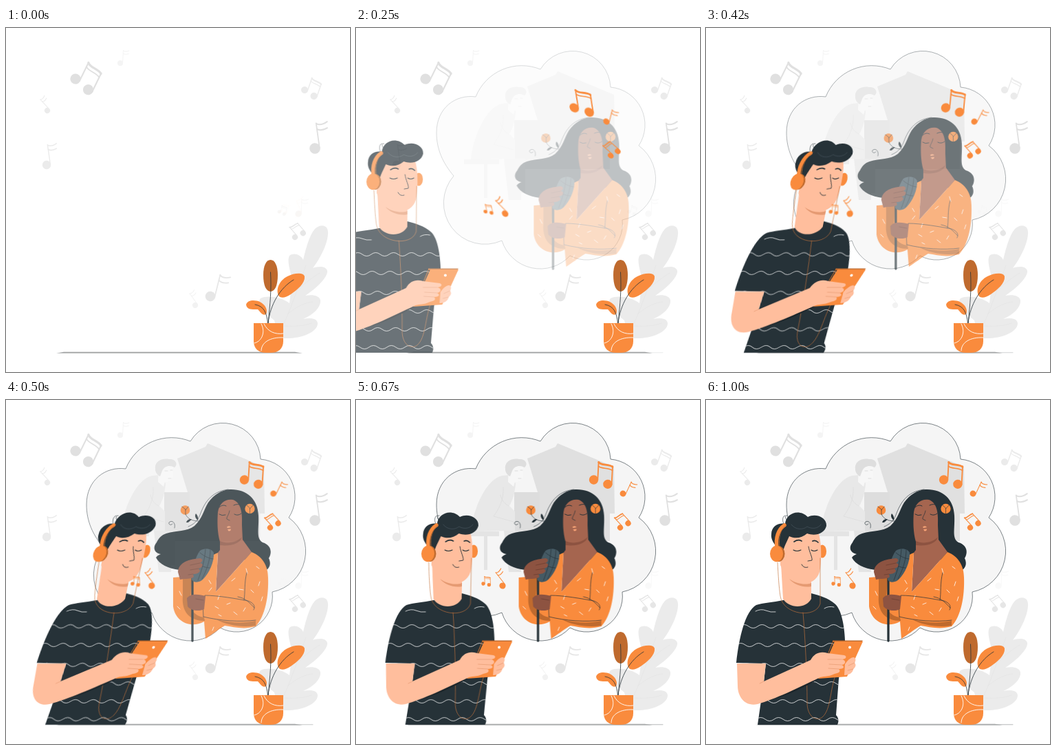
Animation of 500x500 px, one loop 1040 ms. Source, as an HTML page:

```html
<!DOCTYPE html>
<html lang="en">
<head>
<meta charset="utf-8">
<title>Listening to music</title>
<style>
  :root { --t: 0s; --ease: cubic-bezier(.36, -.01, .5, 1.38); }
  html, body { margin: 0; width: 100%; height: 100%; overflow: hidden; background: #fff; }
  svg { display: block; width: 100vw; height: 100vh; }
  .cloud, .singer, .man, .tunes { animation: fade 1s var(--ease) var(--t) both paused; }
  .singer { animation-name: slide; }
  .man { animation-name: enterLeft; transform-origin: 0 315px; }
  .tunes { animation-name: enterRight; animation-duration: .6s; transform-origin: 0 181px; }
  @keyframes fade { from { opacity: 0; } to { opacity: 1; } }
  @keyframes slide {
    from { opacity: 0; transform: translateX(30px); }
    to { opacity: 1; transform: translateX(0); }
  }
  @keyframes enterLeft {
    from { opacity: 0; transform: translateX(-250px) skewX(20deg); }
    60% { opacity: 1; transform: translateX(0) skewX(-10deg); }
    80% { opacity: 1; transform: translateX(0) skewX(2deg); }
    to { opacity: 1; transform: translateX(0) skewX(0deg); }
  }
  @keyframes enterRight {
    from { opacity: 0; transform: translateX(250px) skewX(-20deg); }
    60% { opacity: 1; transform: translateX(0) skewX(10deg); }
    80% { opacity: 1; transform: translateX(0) skewX(-2deg); }
    to { opacity: 1; transform: translateX(0) skewX(0deg); }
  }
  .line { fill: none; stroke-linecap: round; stroke-linejoin: round; }
  .ink { fill: #263238; }
  .orange { fill: #f98b3d; }
  .rust { fill: #bf6a2e; }
  .skin { fill: #ffbe9d; }
  .brown { fill: #a5654f; }
  .dusk { fill: #8d5341; }
  .inkline { stroke: #263238; }
  .white { stroke: #fff; }
</style>
</head>
<body>
<svg viewBox="0 0 500 500">
  <defs>
    <g id="pair" fill="currentColor" stroke="none">
      <circle r="7.6"/>
      <circle cx="23.5" cy="6" r="7.6"/>
      <g class="line" stroke="currentColor">
        <path stroke-width="2.1" d="M6.6 0V-30M30 6V-24"/>
        <path stroke-width="3.2" d="M6.6 -29.5C11 -23.500 23 -28 30 -23"/>
        <path stroke-width="1.8" d="M6.6 -23C11 -18 23 -22 30 -17"/>
      </g>
    </g>
    <g id="solo" fill="currentColor" stroke="none">
      <circle r="7.8"/>
      <g class="line" stroke="currentColor">
        <path stroke-width="1.8" d="M6.8 0V-36"/>
        <path stroke-width="2" d="M6.8 -35.5C11 -32 17 -33 23 -36M6.8 -27.5C11 -24 17 -25 22 -27"/>
      </g>
    </g>
    <path id="shirt" d="M112 291C98 294 82 295 73 298C57 307 48 345 44 382L87 383L84 410L75 472H191C194 466 192 461 189 458L193 405L202 350C201 325 196 303 187 296C178 288 165 284 153 281Z"/>
    <path id="wave" d="M36 0q6.5 6 13 1t13 0t13 0t13 0t13 0t13 0t13 0t13 0t13 0t13 0t13 0t13 0t13 0"/>
    <clipPath id="inShirt"><use href="#shirt"/></clipPath>
  </defs>

  <!-- grey notes -->
  <g color="#ebebeb">
    <use href="#pair" transform="translate(101 74) rotate(26)" color="#e0e0e0"/>
    <use href="#solo" transform="translate(449 175) rotate(-8)" color="#e0e0e0"/>
    <use href="#pair" transform="translate(434 90) rotate(19) scale(.67)"/>
    <use href="#pair" transform="translate(420 304) rotate(-41) scale(.54)" color="#e6e6e6"/>
    <use href="#pair" transform="translate(397 267) rotate(12) scale(.33)" color="#f8f8f8"/>
    <use href="#solo" transform="translate(59 199) rotate(-8) scale(.8)"/>
    <use href="#solo" transform="translate(297 390) rotate(14) scale(.94)" color="#e6e6e6"/>
    <use href="#solo" transform="translate(166 51) rotate(3) scale(.52)" color="#f4f4f4"/>
    <use href="#solo" transform="translate(60 120) rotate(-43) scale(.52)"/>
    <use href="#solo" transform="translate(275 403) rotate(-36) scale(.52)" color="#f2f2f2"/>
    <use href="#solo" transform="translate(425 270) rotate(2) scale(.6)" color="#f9f9f9"/>
  </g>

  <!-- ground -->
  <path fill="#a6a8a9" d="M73 472.7L84 470.8H420L431 472.7Z"/>

  <!-- thought bubble, piano and pianist -->
  <g class="cloud">
    <path class="line" stroke="#b5b7b8" stroke-width="1" d="M76 471.8H446"/>
    <path fill="#f5f5f5" stroke="#263238" stroke-width=".6" d="M174 100A72 72 0 0 1 268 60A55 55 0 0 1 370 86A55 55 0 0 1 411 171A60.500 60.500 0 0 1 387 279A52 52 0 0 1 311 331A58.500 58.500 0 0 1 212 309A60 60 0 0 1 142 215C126 196 117 176 117 152C117 116 145 96 174 100Z"/>
    <path fill="#e0e0e0" d="M293 63L375 97L376 165H369V205H240V190H232V134H264L249 85L290 68Z"/>
    <path fill="#dddddd" d="M230 134H267V190H230Z"/>
    <g fill="#e4e4e4">
      <path d="M157 191H208V198H157ZM186 198H191V247H186Z"/>
      <path d="M215 190H246V240H240V250H222Z"/>
      <path fill="#e8e8e8" d="M167 191C170 160 188 116 212 110L224 109L232 121C231 135 228 145 223 154L231 162V190Z"/>
    </g>
    <path class="line" stroke="#d8d8d8" stroke-width=".6" d="M214 127C215 145 208 158 200 169L229 177M222 154C216 151 211 145 210 138"/>
    <path fill="#f7f7f7" d="M222 97C230 92 241 93 243 98L243 110C241 117 236 120 231 119L229 126L221 119Z"/>
    <path fill="#dedede" d="M217 101C215 90 226 84 237 86C246 85 251 93 245 98C238 94 230 96 227 103L224 111C220 109 217 105 217 101Z"/>
    <path class="line" stroke="#cfcfcf" stroke-width=".7" d="M231 103h4M239 102h3M236 114h4"/>
  </g>

  <!-- singer -->
  <g class="singer">
    <path class="ink" d="M319 130C343 129 360 143 361 168C362 188 357 201 367 207C380 211 381 222 376 230C380 238 377 246 370 248C358 248 340 235 335 225L302 222C298 240 268 250 246 247C230 245 217 239 212 229C214 226 217 225 219 224C209 222 207 214 213 207C216 201 220 196 227 194C242 189 257 192 268 183C280 172 281 160 288 149C297 137 307 131 319 130Z"/>
    <path class="line inkline" stroke-width=".6" d="M317 130C291 133 282 151 276 167C272 177 266 181 259 184"/>
    <path class="brown" d="M302 163C304 150 313 143 324 145C335 149 338 162 337 182L338 203L351 221C336 238 318 258 299 279L302 222L305 218V206C301 192 301 176 302 163Z"/>
    <path class="dusk" d="M305 205C315 210 330 207 337 199C335 209 320 213 305 211Z"/>
    <g class="line inkline" stroke-width="1">
      <path d="M304 156Q309 151 314 154M325 153Q331 150 336 153"/>
      <path d="M304 166Q308 169 313 167M326 166Q331 169 336 165"/>
      <path stroke-width=".7" d="M319 161C318 167 314 171 315 173L319 175"/>
    </g>
    <path fill="#f6a276" d="M315 184.500Q319 182 321 185L316 186ZM316 188L321 187.500Q321 191 317.500 190.500Z"/>
    <path class="orange" d="M302 222L299 279C318 258 336 238 351 221C366 227 375 240 375 258C376 285 371 314 357 329C340 334 325 330 312 328C302 334 292 342 284 347L282 322C262 333 240 322 237 300V258L263 256L281 242C286 231 294 225 302 222Z"/>
    <g class="rust">
      <path d="M251 258H264L262 288C259 300 266 314 282 316L283 321C261 321 249 308 251 285Z"/>
      <path d="M300 319C320 324 340 325 357 321L357 328C336 331 314 327 300 319Z"/>
    </g>
    <path class="line white" stroke-width=".8" d="M246 278l3 6M243 300l4 4M290 240l3 -6M289 262l3 5M293 273l-4 5M304 284l-2 6M322 263l5 -4M333 275l6 1M345 252l-2 -7M358 242l4 3M363 264l-2 6M350 276l4 4M367 286l-2 6M298 300l5 3M315 297l5 -2M325 308l5 4M342 302l-3 5M296 330l-2 5M307 314l-4 -2"/>
    <path class="line inkline" stroke-width=".7" d="M281 315C280 304 281 294 283 284C302 284 330 289 346 292C354 295 357 300 354 305M281 315C305 321 335 323 357 320M344 251C340 266 342 280 340 291M331 286C343 288 349 296 355 302"/>
    <path class="line inkline" stroke-width="3.300" stroke-linecap="butt" d="M265 255V350"/>
    <path fill="#455a64" d="M276 219C283 214 294 216 296 222C297 235 289 252 281 260C276 266 266 266 264 261C264 247 269 228 276 219Z"/>
    <path class="line inkline" stroke-width=".7" d="M276 222C282 227 288 230 295 231M271 236C277 241 284 244 290 244M284 217C283 231 279 247 273 262M291 218C291 232 286 247 279 260"/>
    <path class="dusk" d="M244 250C245 238 255 232 276 230C281 231 280 235 276 237L279 238C281 242 277 244 274 245L276 248C275 252 270 253 266 253L267 257C263 261 255 259 247 261Z"/>
    <path class="dusk" d="M257 288C263 280 277 283 284 285L282 304C275 308 262 306 258 300Z"/>
    <path class="line" stroke="#62382d" stroke-width=".6" d="M276 237L262 240M274 245L262 247M266 253L259 254M281 291L270 289"/>
    <circle class="orange" cx="348.500" cy="158" r="7.200"/>
    <circle class="orange" cx="254.500" cy="160" r="6.800"/>
    <path class="line inkline" stroke-width=".65" d="M348.500 165V157L344 153M348.500 158L353 153M255 166V159L250 155M255 160L259 155M255 166C258 173 265 176 274 176M239 186C241 178 235 174 231 178C230 181 234 183 236 180"/>
    <path class="ink" d="M264 173C259 179 258 178 256 178C258 173 261 173 264 173ZM270 165C273 168 274 173 273 175C269 172 268 168 270 165Z"/>
  </g>

  <!-- listener -->
  <g class="man">
    <ellipse class="orange" cx="169" cy="220" rx="6" ry="9.500"/>
    <use href="#shirt" class="ink"/>
    <path class="skin" d="M108 222L112 289C120 303 145 304 153 289V258Z"/>
    <path fill="#e59a72" d="M121 260C132 268 146 269 153 266V271C141 273 129 269 121 260Z"/>
    <path class="skin" d="M108 205C114 188 142 186 163 192C168 205 168 228 166 245C164 260 154 267 140 266C124 264 114 254 108 240Z"/>
    <path class="ink" d="M95 195C95 184 105 178 115 180C116 165 135 157 148 170C160 164 176 171 175 183C172 195 158 198 147 194C139 201 129 202 121 198C117 207 113 214 112 221L104 215C98 208 94 202 95 195Z"/>
    <path class="line inkline" stroke-width=".6" d="M113 180C110 174 112 168 115 168M117 174C114 171 115 167 118 168"/>
    <path class="line" stroke="#52616a" stroke-width=".5" d="M124 181C130 189 141 189 147 184C154 188 163 187 167 181"/>
    <g class="line inkline" stroke-width="1.100">
      <path stroke-width="1.700" d="M128 206Q134 202 139 205M155 205Q159 203 163 207"/>
      <path d="M127 218Q132 221 138 218M153 218Q157 221 162 218"/>
      <path stroke-width=".9" d="M149 213C150 221 155 229 154 233L148 234M139 239Q142 245 148 243"/>
    </g>
    <path class="line" stroke="#f98b3d" stroke-width="5.500" d="M114 182C105 188 101 200 103 214"/>
    <path class="line" stroke="#bf6a2e" stroke-width=".8" d="M117 181C108 188 105 200 107 213"/>
    <ellipse class="rust" cx="105" cy="223.500" rx="9.500" ry="11.500"/>
    <ellipse class="orange" cx="102.500" cy="223.500" rx="9.500" ry="11.700"/>
    <g clip-path="url(#inShirt)" class="line white" stroke-width=".75">
      <use href="#wave" y="328"/>
      <use href="#wave" x="-5" y="355"/>
      <use href="#wave" x="3" y="384"/>
      <use href="#wave" x="-3" y="411"/>
      <use href="#wave" x="4" y="437"/>
      <use href="#wave" x="-2" y="463"/>
      <path d="M72 307q8 -4 15 -1t14 2M172 303q6 -4 14 -2"/>
    </g>
    <path class="line" stroke="#c4733c" stroke-width=".65" d="M104 236C105 255 106 272 108 285C112 313 160 318 166 296V230M141 309C144 345 147 400 147 440C147 460 160 468 169 461C182 450 180 420 189 398"/>
    <path fill="#1c262b" d="M92 436C118 430 144 417 167 404L140 402Z"/>
    <path class="rust" d="M184 349.500H228L226 352H184Z"/>
    <path class="orange" d="M187 351H228L205 402L163 405Z"/>
    <path class="line" stroke="#bf6a2e" stroke-width="1" d="M185 350L163 404"/>
    <circle cx="209" cy="359.500" r="2" fill="#fff"/>
    <path class="skin" d="M202 384C207 376 215 371 217 376C218 378 217 380 216 382C219 385 217 389 214 391C214 396 208 400 201 400Z"/>
    <path class="skin" d="M45 383L87 383L84 409L152 378C158 367 167 365 177 368L201 371C206 373 203 377 197 377C204 378 204 384 197 385C203 388 199 391 193 391C197 395 192 397 187 398C177 403 169 401 164 404C135 418 100 435 75 442C57 446 46 432 46 415Z"/>
    <path class="line" stroke="#e59a72" stroke-width=".7" d="M197 377L177 377M197 385L179 384M193 391L178 390M216 382L207 386M214 391L206 393M84 409L78 412"/>
  </g>

  <!-- orange notes -->
  <g class="tunes" color="#f98b3d">
    <use href="#pair" transform="translate(345.500 116) rotate(3) scale(.88)"/>
    <use href="#pair" transform="translate(384 185.500) rotate(-43) scale(.54)"/>
    <use href="#pair" transform="translate(185 267) rotate(-3) scale(.35)"/>
    <use href="#solo" transform="translate(388 136) rotate(25) scale(.57)"/>
    <use href="#solo" transform="translate(213 270) rotate(-38) scale(.59)"/>
  </g>

  <!-- plant -->
  <path fill="#ebebeb" d="M404 451C430 452 452 442 453 430C453 422 443 421 432 423C448 416 458 405 457 396C456 389 446 387 435 389C452 378 468 362 467 353C465 346 455 346 446 349C456 336 469 312 468 296C467 285 456 285 449 292C441 301 436 320 432 337C428 329 418 326 412 331C408 338 413 352 416 366L412 400C400 391 380 388 370 393C364 400 372 410 390 425C392 436 398 446 404 451Z"/>
  <path class="line" stroke="#e0e0e0" stroke-width=".5" d="M398 442C414 410 425 375 436 345M410 415C425 403 436 399 446 398M404 433C420 434 434 433 444 429M424 380C436 370 446 362 456 356"/>
  <path class="rust" d="M384.500 337C391 337 395 346 395 359C395 374 391 383 384.500 383C378 383 374 374 374 359C374 346 378 337 384.500 337Z"/>
  <path class="orange" d="M397 390C391 381 397 367 409 361C419 356 432 355 434 361C435 371 424 380 414 387C407 392 400 393 397 390Z"/>
  <path class="orange" d="M349 402C351 395 362 395 369 398C377 402 381 410 378 416C373 419 370 413 366 409C358 409 350 410 349 402Z"/>
  <path class="line inkline" stroke-width=".8" d="M381 429C384 400 386 380 384.500 355M381 429C384 402 398 378 418 366M380.500 429C379 414 375 404 362 402"/>
  <path class="orange" d="M360 429H403V455C403 466 396 472 385 472H378C367 472 360 466 360 455Z"/>
  <path class="line white" stroke-width=".9" d="M371 430C378 443 371 456 361 458M375 430C380 441 391 446 403 444M371 469C371 457 384 449 403 450"/>
</svg>
<script>
  // Advance the paused CSS animations at 24 frames per second.
  const LOOP = 1040, STEP = 1000 / 24, LEAD = 32;
  const start = performance.now();
  function tick() {
    const t = (performance.now() - start) % LOOP;
    const frame = Math.min(24, Math.floor((t + 8) / STEP));
    document.documentElement.style.setProperty('--t', `${-(frame * STEP + LEAD)}ms`);
    requestAnimationFrame(tick);
  }
  tick();
</script>
</body>
</html>
```
